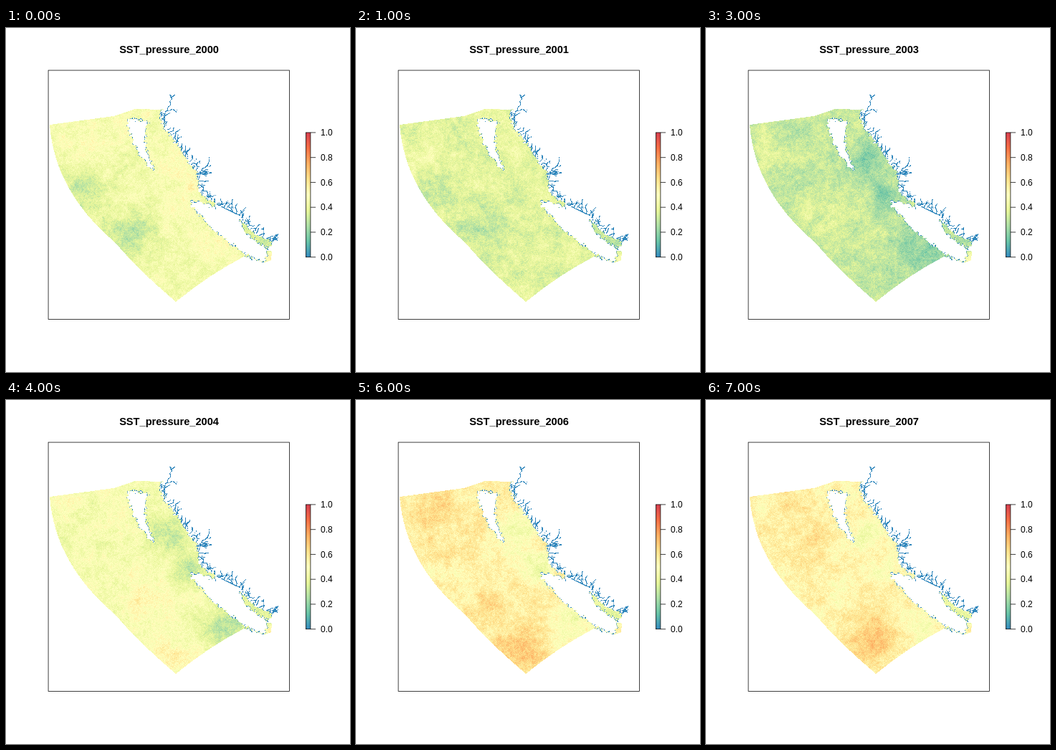
Write an HTML page with a canvas that moves like this. It is 480 by 480 pixels and loops after 8 s.

```html
<!DOCTYPE html>
<html lang="en">
<head>
<meta charset="utf-8">
<title>SST pressure</title>
<style>
  html, body { margin: 0; width: 100%; height: 100%; overflow: hidden; background: #fff; }
  canvas { display: block; }
</style>
</head>
<body>
<canvas id="stage" width="480" height="480"></canvas>
<script>
const SIZE = 480, FIRST_YEAR = 2000, YEAR_COUNT = 8;
const ctx = document.getElementById('stage').getContext('2d');

const PALETTE = ['#3288bd', '#66c2a5', '#abdda4', '#e6f598', '#ffffbf',
  '#fee08b', '#fdae61', '#f46d43', '#d53e4f'];
const STOPS = PALETTE.map(c => [1, 3, 5].map(i => parseInt(c.substr(i, 2), 16)));

const MAINLAND = 'M222,114L214,118 222,138 246,172 266,203 272,232 294,246';
const ISLAND = 'L292,251 268,242 258,243Q280,282 345,321L360,323 365,308';
const OUTER = 'L371,312 370,324 362,327 332,319Q285,343 237,382Q185,338 152,299Q68,228 61,135L150,123 180,113Z';
const STRAIT = 'M327,265Q340,290 369,295L371,304 366,308Q338,294 328,276Z';
const ARCHIPELAGO = 'M170,131L174,126 199,132Q190,145 194,166L208,202Q176,172 170,131';
const INLET_MOUTHS = MAINLAND + 'L327,262Q340,290 369,295L371,306';

// Level, extra level along the shore, then patches: x, y, radius, amount
const LEVELS = {
  2000: { base: .45, shore: .05, patches: [[105, 230, 30, -.14], [172, 288, 38, -.15]] },
  2002: { base: .29, shore: -.01, patches: [[95, 178, 28, .11], [195, 130, 30, .08], [150, 235, 28, .06]] },
  2003: { base: .30, shore: -.12, patches: [[90, 175, 26, .08], [170, 255, 40, .07]] },
  2004: { base: .46, shore: -.18, patches: [[190, 285, 25, .06], [230, 360, 25, .11]] },
  2005: { base: .56, shore: -.14, patches: [[95, 155, 36, .11], [185, 285, 24, .13], [228, 350, 34, .13]] },
  2007: { base: .54, shore: -.06, patches: [[150, 185, 36, .08], [232, 335, 38, .15], [115, 140, 25, .07]] }
};
const SHORE_PATCHES = [[225, 188, 25], [253, 235, 22], [305, 315, 30]];

function hash(x, y, seed) {
  let h = Math.imul(x, 374761393) ^ Math.imul(y, 668265263) ^ Math.imul(seed + 7, 1274126177);
  h = Math.imul(h ^ h >>> 15, 2246822519);
  h = Math.imul(h ^ h >>> 13, 3266489917);
  return ((h ^ h >>> 16) >>> 0) / 4294967296;
}

let draws = 0;
const random = () => hash(draws++, 5, 3);

function smoothNoise(x, y, seed) {
  const i = Math.floor(x), j = Math.floor(y);
  const ease = t => t * t * (3 - 2 * t);
  const u = ease(x - i), v = ease(y - j);
  const row = k => hash(i, k, seed) * (1 - u) + hash(i + 1, k, seed) * u;
  return row(j) * (1 - v) + row(j + 1) * v - .5;
}

function texture(x, y, seed) {
  return smoothNoise(x / 20, y / 20, seed) * .08 + smoothNoise(x / 8, y / 8, seed + 20) * .07 +
    smoothNoise(x / 3, y / 3, seed + 40) * .07 + (hash(x, y, seed + 60) - .5) * .1;
}

function colour(value) {
  const p = Math.max(0, Math.min(.9999, value)) * 8, i = Math.floor(p);
  return STOPS[i].map((c, k) => c + (STOPS[i + 1][k] - c) * (p - i));
}

// Paints on a spare canvas and returns a test for covered pixels
function mask(paint, threshold = 127) {
  const c = new OffscreenCanvas(SIZE, SIZE).getContext('2d');
  paint(c);
  const { data } = c.getImageData(0, 0, SIZE, SIZE);
  return (x, y) => data[(y * SIZE + x) * 4 + 3] > threshold;
}

// A wandering inlet that forks now and then
function inlet(c, x, y, heading, length) {
  for (let left = length; left > 0; left -= 3) {
    const angle = heading + (random() - .5) * 1.5;
    c.beginPath();
    c.moveTo(x, y);
    x += 3 * Math.cos(angle);
    y += 3 * Math.sin(angle);
    c.lineTo(x, y);
    c.stroke();
    if (left > 5 && random() < .22) inlet(c, x, y, heading + (random() < .5 ? -1 : 1), left * .5);
  }
}

const inWater = mask(c => {
  c.fill(new Path2D(MAINLAND + ISLAND + OUTER));
  c.fill(new Path2D(STRAIT));
  c.globalCompositeOperation = 'destination-out';
  c.fill(new Path2D(ARCHIPELAGO));
});
const nearShore = mask(c => {
  c.lineWidth = 8;
  for (const d of [MAINLAND + ISLAND, STRAIT, ARCHIPELAGO]) c.stroke(new Path2D(d));
});
const isInlet = mask(c => {
  const mouths = document.createElementNS('http://www.w3.org/2000/svg', 'path');
  mouths.setAttribute('d', INLET_MOUTHS);
  for (let s = 10; s < mouths.getTotalLength(); s += 5) {
    const { x, y } = mouths.getPointAtLength(s);
    inlet(c, x, y, -.95 + (random() - .5) * 1.3, 4 + 13 * random());
  }
  inlet(c, 222, 131, -1.2, 45);
  inlet(c, 268, 212, -.95, 38);
  c.stroke(new Path2D('M294,246L327,262'));
}, 95);

// Roughens the shoreline but leaves the open boundary smooth
function isSea(x, y) {
  if (!nearShore(x, y)) return inWater(x, y);
  const shift = seed => Math.round(smoothNoise(x / 2.5, y / 2.5, seed) * 6);
  return inWater(x + shift(90), y + shift(91));
}

function levelIn(year, x, y) {
  // Years without their own levels lie halfway between their neighbours
  if (!LEVELS[year]) return (levelIn(year - 1, x, y) + levelIn(year + 1, x, y)) / 2;
  const { base, shore, patches } = LEVELS[year];
  const bump = (cx, cy, r) => Math.exp(-((x - cx) ** 2 + (y - cy) ** 2) / (r * r));
  if (x > 326 && y < 312) return base * .5 + .13;
  if (x > 334) return base * .5 + .17 + .14 * bump(368, 321, 8);
  const open = patches.reduce((sum, [cx, cy, r, amount]) => sum + amount * bump(cx, cy, r), base);
  return SHORE_PATCHES.reduce((sum, p) => sum + shore * bump(...p), open);
}

function drawMap(year) {
  const image = new ImageData(SIZE, SIZE);
  for (let y = 70; y < 390; y++) for (let x = 60; x < 380; x++) {
    const sea = isSea(x, y);
    const edge = sea && nearShore(x, y) && !(isSea(x - 1, y) && isSea(x + 1, y) && isSea(x, y + 1));
    const blue = isInlet(x, y) || edge;
    if (!sea && !blue) continue;
    const value = blue && hash(x, y, 99) < (edge ? .45 : .9) ? 0 : levelIn(year, x, y) + texture(x, y, year - FIRST_YEAR);
    if (sea || value === 0) image.data.set([...colour(value), 255], (y * SIZE + x) * 4);
  }
  return image;
}

function drawLegend() {
  const left = 418.44, right = 424.92, top = 145.92, bottom = 319.68;
  const ramp = ctx.createLinearGradient(0, bottom, 0, top);
  PALETTE.forEach((c, i) => ramp.addColorStop(i / 8, c));
  ctx.fillStyle = ramp;
  ctx.fillRect(left, top, right - left, bottom - top);
  ctx.strokeRect(left, top, right - left, bottom - top);
  ctx.fillStyle = '#000';
  ctx.font = '12px "Liberation Sans", Arial, sans-serif';
  ctx.textAlign = 'left';
  for (let i = 0; i <= 5; i++) {
    const y = bottom + (top - bottom) * i / 5;
    ctx.stroke(new Path2D(`M${right},${y}h7.2`));
    ctx.fillText((i / 5).toFixed(1), 439, Math.round(y + 4.3));
  }
}

const maps = Array.from({ length: YEAR_COUNT }, (_, i) => drawMap(FIRST_YEAR + i));
let shown = -1;

function render(now) {
  const index = Math.floor(now / 1000) % YEAR_COUNT;
  if (index !== shown) {
    shown = index;
    ctx.putImageData(maps[index], 0, 0);
    ctx.strokeStyle = '#000';
    ctx.lineWidth = .75;
    ctx.strokeRect(59.04, 59.04, 336.5, 347.52);
    drawLegend();
    ctx.font = 'bold 14.6px "Liberation Sans", Arial, sans-serif';
    ctx.textAlign = 'center';
    ctx.fillText(`SST_pressure_${FIRST_YEAR + index}`, 227.5, 35);
  }
  requestAnimationFrame(render);
}
requestAnimationFrame(render);
</script>
</body>
</html>
```
